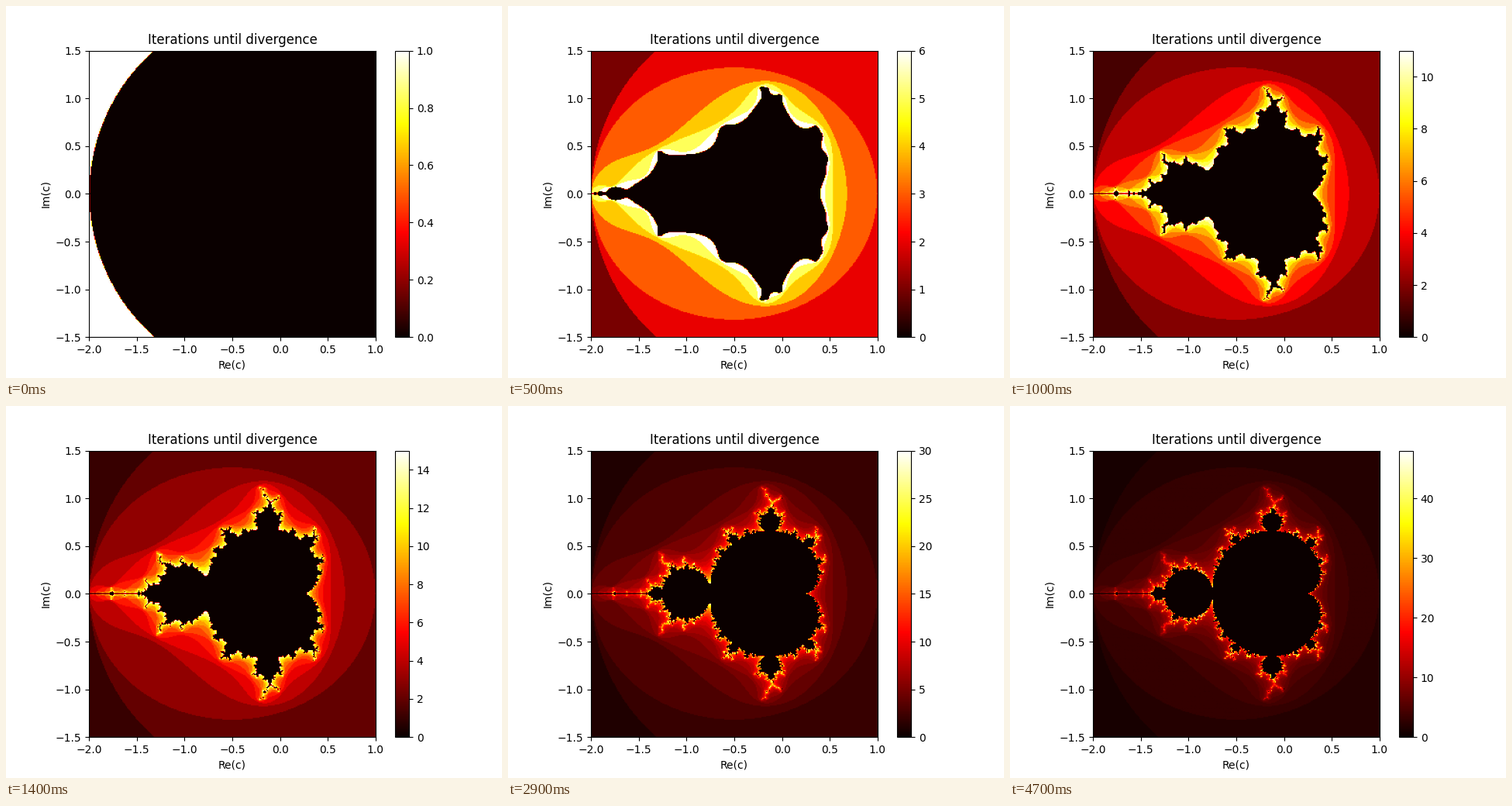
These frames come from a looping animation (640x480 px, 4800 ms). A matplotlib script:

```python
import numpy as np
import matplotlib.pyplot as plt
from matplotlib.animation import FuncAnimation

STEPS = 48
SIZE = 301
XMIN, XMAX, YMIN, YMAX = -2, 1, -1.5, 1.5


def escape_counts(steps):
    """Iteration at which each point leaves |z| <= 2, or 0 if it stays."""
    x = np.linspace(XMIN, XMAX, SIZE)
    y = np.linspace(YMIN, YMAX, SIZE)
    c = x[None, :] + 1j * y[:, None]
    z = np.zeros_like(c)
    counts = np.zeros(c.shape)
    for n in range(1, steps + 1):
        inside = counts == 0
        z[inside] = z[inside] ** 2 + c[inside]
        counts[inside & (np.abs(z) > 2)] = n
    return counts


counts = escape_counts(STEPS)


def counts_until(n):
    return np.where(counts <= n, counts, 0)


fig, ax = plt.subplots(figsize=(6.4, 4.8), dpi=100)
image = ax.imshow(counts_until(1), cmap="hot", vmin=0, vmax=1,
                  origin="lower", extent=(XMIN, XMAX, YMIN, YMAX))
fig.colorbar(image, ax=ax)
ax.set_title("Iterations until divergence")
ax.set_xlabel("Re(c)")
ax.set_ylabel("Im(c)")


def update(frame):
    n = frame + 1
    image.set_data(counts_until(n))
    image.set_clim(0, n)
    return [image]


anim = FuncAnimation(fig, update, frames=STEPS, interval=100,
                     repeat=True, repeat_delay=0, blit=False)
plt.show()
```
